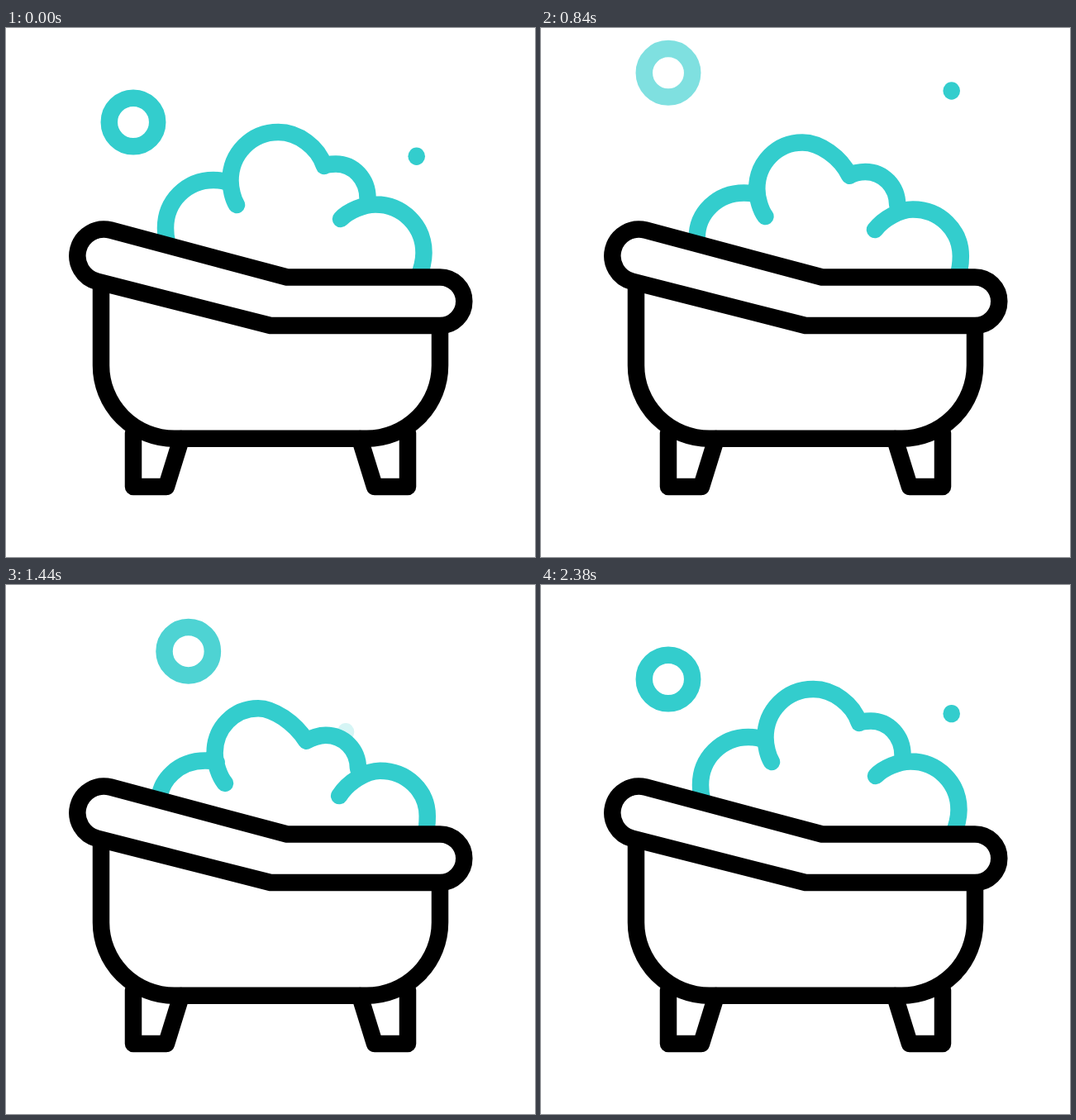
These frames come from a looping animation (640x640 px, 2400 ms). An HTML page:

```html
<!DOCTYPE html>
<html lang="en">
<head>
<meta charset="utf-8">
<title>Bubble bath</title>
<style>
  html, body { margin: 0; width: 100%; height: 100%; overflow: hidden; background: #fff; }
  svg { display: block; width: 100%; height: 100%; }
  path, .ring { fill: none; stroke: #33cdcd; stroke-width: 20.5; stroke-linecap: round; stroke-linejoin: round; }
  .dot { fill: #33cdcd; }
  .tub path { stroke: #000; }
  .tub .rim { fill: #fff; }
</style>
</head>
<body>
<svg viewBox="0 0 640 640">
  <g id="bubbles"></g>
  <path id="foam"/>
  <g class="tub">
    <path d="M154 490V555H194L212 497M486 490V555H446L428 497"/>
    <path d="M115 312V408A88.5 88.5 0 0 0 203.5 496.7H436.5A88.5 88.5 0 0 0 525 408V364"/>
    <path class="rim" d="M340 301.5L126.5 244.5A32 32 0 0 0 110.5 306.7L320 360H525A29 29 0 0 0 525 301.5Z"/>
  </g>
</svg>
<script>
const LOOP = 2400;
const mix = (a, b, p) => a + (b - a) * p;
const ramp = (t, a, b) => Math.min(1, Math.max(0, (t - a) / (b - a)));
const ease = p => p * p * (3 - 2 * p);

// A foam point: rest position, travel when sunk, and how its curve bends.
// "side" has an upright tangent, "top" a level one, "end" follows its neighbour.
const point = kind => (x, y, dx, dy, bend = 0.6, dBend = 0) => ({ kind, x, y, dx, dy, bend, dBend });
const [side, topOf, end] = ['side', 'top', 'end'].map(point);

const lobes = [
  [end(196, 262, -10, 40), side(193, 242, -13, 36), topOf(251, 184, -16.5, 47), end(269, 187, -23.5, 45)],
  [end(279, 214, -23, 42.5), side(271.5, 184.5, -31, 30.5), topOf(329.5, 126, -40, 38),
    end(385, 167, -35.5, 35.5, 0.77, -0.34), topOf(399, 164.5, -20, 28.5), side(437.5, 206, -19, 26)],
  [end(405, 231, -3, 39.5), topOf(447, 213.5, 9, 18.5), side(505.5, 272, 7, 12.5), end(499, 300, 13, 7)]
];

// Where the tangents of two neighbouring points meet.
function corner(p, q) {
  const [a, b] = p.kind === 'end' ? [q, p] : [p, q];
  const reach = b.kind === 'end' ? b.bend : 1;
  return a.kind === 'side'
    ? { x: a.x, y: mix(a.y, b.y, reach) }
    : { x: mix(a.x, b.x, reach), y: a.y };
}

const ROUND = 0.56;
const xy = p => `${p.x.toFixed(2)} ${p.y.toFixed(2)} `;
const toward = (p, q) => xy({ x: mix(p.x, q.x, ROUND), y: mix(p.y, q.y, ROUND) });

function curve(points) {
  return points.map((q, i) => {
    if (!i) return 'M' + xy(q);
    const p = points[i - 1], c = corner(p, q);
    return 'C' + toward(p, c) + toward(q, c) + xy(q);
  }).join('');
}

// The foam sinks and swells by turns; the last time its right lobe also slides out.
const turns = [0, 600, 990, 1265, 1675, 1970, 2270];

function foamAt(t) {
  const i = turns.findLastIndex(time => time <= t);
  const p = ease(ramp(t, turns[i], turns[i + 1] ?? LOOP));
  const sunk = i === turns.length - 1 ? 0 : i % 2 ? 1 - p : p;
  const slide = i >= 4 ? sunk : 0;
  return lobes.map((lobe, n) => curve(lobe.map(k => ({
    kind: k.kind,
    x: k.x + k.dx * sunk + (n === 2 ? 9 * slide : 0),
    y: k.y + k.dy * sunk - (n === 2 ? 3 * slide : 0),
    bend: k.bend + k.dBend * sunk
  })))).join('');
}

// Bubbles fade in and out, except where they stand at rest.
const sizes = { ring: [29.2, 29.2], dot: [10.3, 10.7] };
const rest = { ring: 114, dot: 155.3 };
const rises = [
  ['ring', 154, rest.ring, 49, 180, 980],
  ['dot', 496.7, rest.dot, 47, 180, 1180],
  ['ring', 220.7, 121, 44, 1180, 1680],
  ['dot', 411, 181, 67, 1380, 1980],
  ['ring', 154, 170, rest.ring, 1900, 2360],
  ['dot', 496.7, 205, rest.dot, 2000, 2400]
].map(([kind, x, from, to, begin, stop]) => {
  const node = document.createElementNS('http://www.w3.org/2000/svg', 'ellipse');
  const [rx, ry] = sizes[kind];
  Object.entries({ class: kind, cx: x, rx, ry }).forEach(([k, v]) => node.setAttribute(k, v));
  document.getElementById('bubbles').append(node);
  return t => {
    const shown = from === rest[kind] ? 1 : ramp(t, begin, begin + 300);
    const gone = to === rest[kind] ? 0 : ramp(t, stop - 200, stop - 40);
    node.setAttribute('cy', mix(from, to, ease(ramp(t, begin, stop))));
    node.setAttribute('opacity', shown * (1 - gone));
  };
});

const foam = document.getElementById('foam');
function draw(now) {
  const t = now % LOOP;
  foam.setAttribute('d', foamAt(t));
  rises.forEach(rise => rise(t));
}

let start;
function tick(now) {
  start ??= now;
  draw(now - start);
  requestAnimationFrame(tick);
}
draw(0);
requestAnimationFrame(tick);
</script>
</body>
</html>
```
